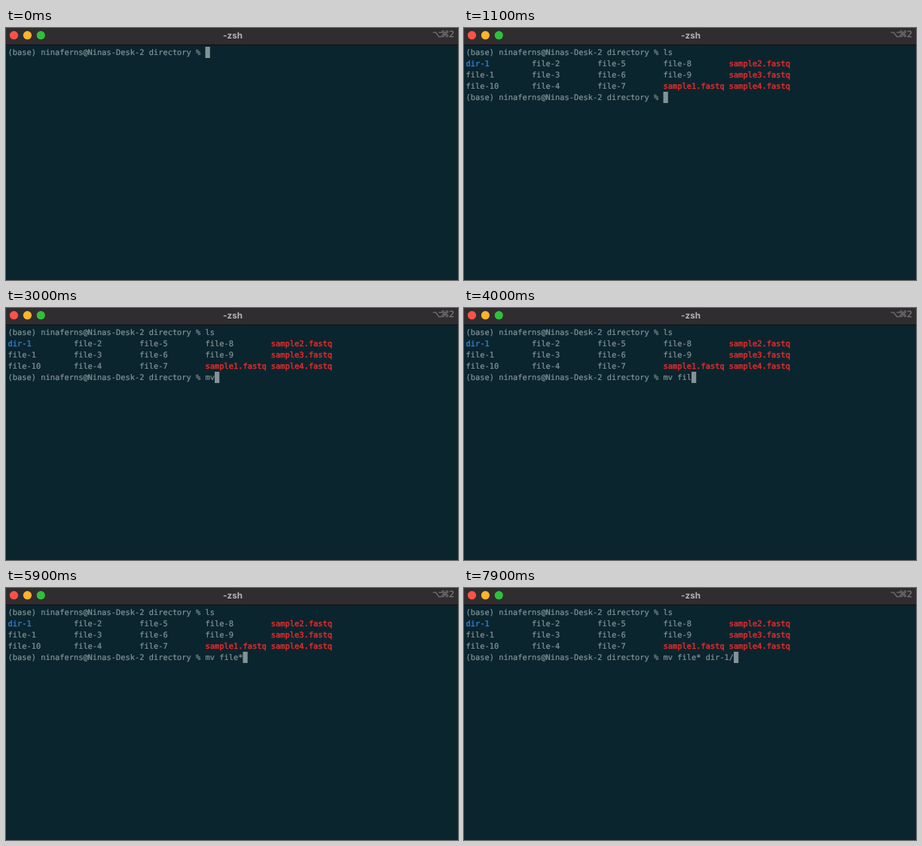
These frames come from a looping animation (600x336 px, 8 s). An HTML page:

```html
<!DOCTYPE html>
<html lang="en">
<head>
<meta charset="utf-8">
<title>Terminal</title>
<style>
  html, body { margin: 0; width: 100%; height: 100%; overflow: hidden; background: #0b252f; }
  svg { display: block; width: 600px; height: 336px; }
  text { white-space: pre; text-rendering: geometricPrecision; }
  #screen text { font: 10.36px "DejaVu Sans Mono", monospace; fill: #839496; stroke: #839496; stroke-width: 0.2px; }
  #screen .dir { fill: #3382d8; stroke: #3382d8; stroke-width: 0.3px; }
  #screen .exec { fill: #e32d2b; stroke: #e32d2b; stroke-width: 0.45px; }
  .title { font: 700 11.6px Inter, sans-serif; fill: #b6b4b7; text-anchor: middle; }
  .keys { font: 11.4px "DejaVu Sans", sans-serif; fill: #777578; stroke: #777578; stroke-width: 0.3px; }
</style>
</head>
<body>
<svg viewBox="0 0 600 336" xmlns="http://www.w3.org/2000/svg">
  <rect width="600" height="336" fill="#0b252f"/>
  <rect width="600" height="22" fill="#302d30"/>
  <rect y="22" width="600" height="1" fill="#0c0f12"/>
  <circle cx="10.5" cy="9.7" r="5.6" fill="#fc5149"/>
  <circle cx="28.4" cy="9.7" r="5.6" fill="#fdb32b"/>
  <circle cx="46.3" cy="9.7" r="5.6" fill="#31c03b"/>
  <text class="title" x="301" y="13.5">-zsh</text>
  <text class="keys" y="12.4"><tspan x="566">⌥</tspan><tspan x="577">⌘</tspan><tspan x="588">2</tspan></text>
  <g id="screen"></g>
</svg>
<script>
const NS = "http://www.w3.org/2000/svg";
const LOOP = 8000, LEFT = 2.6, CELL = 6.237, ROW = 15;
const PROMPT = "(base) ninaferns@Ninas-Desk-2 directory % ";
const LISTED_AT = 1100;
const COLUMNS = [
  ["dir-1", "file-1", "file-10"],
  ["file-2", "file-3", "file-4"],
  ["file-5", "file-6", "file-7"],
  ["file-8", "file-9", "sample1.fastq"],
  ["sample2.fastq", "sample3.fastq", "sample4.fastq"]
];
// Each entry: time in ms, what the command line shows from then on
const FIRST = [[0, ""], [400, "l"], [600, "ls"]];
const SECOND = [
  [0, ""], [2700, "m"], [2900, "mv"], [3100, "mv "], [3500, "mv f"],
  [3700, "mv fi"], [3900, "mv fil"], [4200, "mv file"], [5800, "mv file*"],
  [6300, "mv file* "], [7200, "mv file* d"], [7400, "mv file* di"],
  [7700, "mv file* dir-1/"]
];

const screen = document.getElementById("screen");

function add(parent, name, attrs) {
  const node = document.createElementNS(NS, name);
  for (const key in attrs) node.setAttribute(key, attrs[key]);
  return parent.appendChild(node);
}

function addText(parent, col, row, content, kind = "") {
  const node = add(parent, "text", {
    x: LEFT + col * CELL, y: 36 + row * ROW, class: kind
  });
  node.textContent = content;
  return node;
}

function kindOf(name) {
  if (name.startsWith("dir")) return "dir";
  return name.endsWith(".fastq") ? "exec" : "";
}

const firstLine = addText(screen, 0, 0, PROMPT);
const output = add(screen, "g", {});
COLUMNS.forEach((names, c) => names.forEach((name, r) =>
  addText(output, c * 14, r + 1, name, kindOf(name))));
const secondLine = addText(output, 0, 4, PROMPT);
const cursor = add(screen, "rect", { width: CELL, height: 15, fill: "#839496" });

function typed(steps, t) {
  return steps.filter(step => step[0] <= t).pop()[1];
}

function setText(node, content) {
  if (node.textContent !== content) node.textContent = content;
}

function render(t) {
  const listed = t >= LISTED_AT;
  const first = typed(FIRST, t), second = typed(SECOND, t);
  setText(firstLine, PROMPT + first);
  setText(secondLine, PROMPT + second);
  output.setAttribute("visibility", listed ? "visible" : "hidden");
  const col = PROMPT.length + (listed ? second : first).length;
  cursor.setAttribute("x", LEFT + col * CELL);
  cursor.setAttribute("y", 25 + (listed ? 4 : 0) * ROW);
}

const start = performance.now();
function tick() {
  render((performance.now() - start) % LOOP);
  requestAnimationFrame(tick);
}
render(0);
requestAnimationFrame(tick);
</script>
</body>
</html>
```
